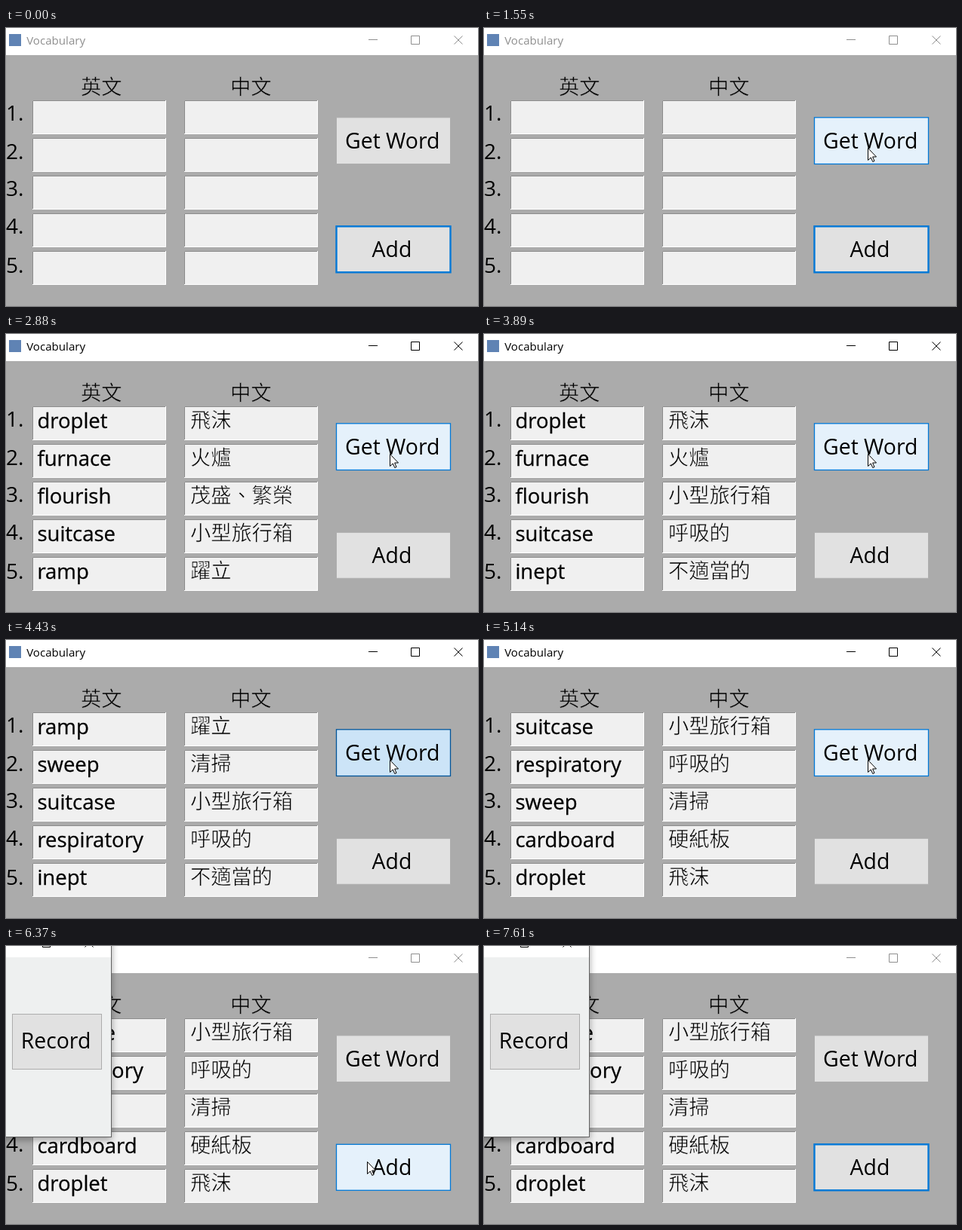
Write an HTML page that moves like this. It is 625x369 px and loops after 8000 ms.

```html
<!DOCTYPE html>
<html lang="zh-TW">
<head>
<meta charset="utf-8">
<title>Vocabulary</title>
<style>
  html, body { margin: 0; width: 100%; height: 100%; overflow: hidden; background: #ababab; }
  svg { display: block; }
  text { font: 28px "Open Sans", "Noto Sans", sans-serif; fill: #000; }
  /* A thin stroke in the backdrop colour slims the glyphs */
  .zh {
    font: 300 27.2px "Noto Sans CJK TC", "Noto Sans CJK", "Noto Sans CJK JP", sans-serif;
    stroke: #f0f0f0;
    stroke-width: .6;
  }
  .head { stroke: #ababab; }
  .word { font-size: 27.5px; stroke: #000; stroke-width: .3; }
  .label { font-size: 28.4px; text-anchor: middle; }
  .caption { font-size: 15.1px; fill: inherit; }
  .btn { fill: #e1e1e1; stroke: #adadad; stroke-width: 1; }

  .bar, .get, .add, .reel, .popup, .cursor { animation: 8s step-end infinite; }
  .bar { animation-name: bar; }
  .get { animation-name: get; }
  .add { animation-name: add; }
  .reel { animation-name: reel; }
  .popup {
    animation-name: popup;
    transform-origin: -80px 60px;
    filter: drop-shadow(0 3px 5px rgba(0, 0, 0, .35));
  }
  .cursor { animation-name: cursor; }

  /* Title bar: inactive, active, inactive */
  @keyframes bar {
    0%, 76.625%, 100% { fill: #8f8f8f; stroke: #8f8f8f; }
    23.375% { fill: #000; stroke: #000; }
  }
  @keyframes get {
    0%, 74.625%, 100% { fill: #e1e1e1; stroke: #adadad; stroke-width: 1; }
    14.46%, 24.25%, 41.75%, 56.375% { fill: #e5f1fb; stroke: #0078d7; stroke-width: 1.3; }
    23.375%, 39.875%, 55.375% { fill: #cce4f7; stroke: #005499; stroke-width: 1.3; }
    68.06% { fill: #e1e1e1; stroke: #0078d7; stroke-width: 2.4; }
  }
  @keyframes add {
    0%, 80.5%, 100% { fill: #e1e1e1; stroke: #0078d7; stroke-width: 2.4; }
    23.375% { fill: #e1e1e1; stroke: #adadad; stroke-width: 1; }
    70.875%, 76.625% { fill: #e5f1fb; stroke: #0078d7; stroke-width: 1.3; }
    74.625% { fill: #cce4f7; stroke: #005499; stroke-width: 1.3; }
  }
  /* Word sheets are stacked 400px apart */
  @keyframes reel {
    0% { transform: translateY(0); }
    36% { transform: translateY(-400px); }
    48.625% { transform: translateY(-800px); }
    49.5% { transform: translateY(-1200px); }
    64.25%, 100% { transform: translateY(-1600px); }
  }
  @keyframes popup {
    0% { opacity: 0; transform: scale(.93); }
    76.625% { opacity: .3; transform: scale(.95); }
    77.625% { opacity: .65; transform: scale(.98); }
    78.625% { opacity: .9; transform: scale(.99); }
    79.625%, 100% { opacity: 1; transform: none; }
  }
  @keyframes cursor {
    0%, 3.75%, 82.5%, 95.125%, 100% { transform: translate(-40px, 0); }
    2.75% { transform: translate(587px, 336px); }

    10.625% { transform: translate(615px, 254px); }
    11.58% { transform: translate(592px, 229px); }
    12.54% { transform: translate(568px, 204px); }
    13.5% { transform: translate(545px, 183px); }
    14.46% { transform: translate(527px, 170px); }
    15.42% { transform: translate(514px, 163px); }
    16.375% { transform: translate(508px, 161px); }
    18.25% { transform: translate(508px, 160px); }
    19.375% { transform: translate(508px, 159px); }

    67.125% { transform: translate(506px, 165px); }
    68.06% { transform: translate(501px, 183px); }
    69% { transform: translate(494px, 212px); }
    69.94% { transform: translate(487px, 243px); }
    70.875% { transform: translate(482px, 266px); }
    71.81% { transform: translate(479px, 280px); }
    72.75% { transform: translate(478px, 286px); }

    80.5% { transform: translate(424px, 240px); }
    81.5% { transform: translate(345px, 172px); }

    90.25% { transform: translate(276px, 109px); }
    91.22% { transform: translate(222px, 98px); }
    92.19% { transform: translate(156px, 81px); }
    93.16% { transform: translate(92px, 64px); }
    94.125% { transform: translate(48px, 54px); }
  }
</style>
</head>
<body>
<svg width="625" height="369" viewBox="0 0 625 369">
  <rect width="625" height="369" fill="#ababab"/>
  <rect width="625" height="36" fill="#fff"/>
  <rect x="4" y="8" width="16" height="16" fill="#5f83b4"/>
  <g class="bar">
    <text class="caption" x="27.2" y="22" stroke="none">Vocabulary</text>
    <path d="M480 15.5h12M536.5 10.5h11v11h-11zM593.5 10.5l11 11m0-11l-11 11" fill="none"/>
  </g>

  <text class="zh head" x="99" y="88">英文</text>
  <text class="zh head" x="297" y="88">中文</text>
  <g id="form"></g>
  <g class="reel" id="reel"></g>

  <rect class="btn get" x="437.5" y="118.8" width="151" height="61.7"/>
  <text class="label" x="511.7" y="160">Get Word</text>
  <rect class="btn add" x="437.5" y="263.3" width="151" height="61"/>
  <text class="label" x="511" y="304">Add</text>

  <g class="popup">
    <rect x="-300.5" y="-200.5" width="440" height="454" fill="#eef0f0" stroke="#626262"/>
    <rect x="-300" y="-200" width="439" height="215" fill="#fff"/>
    <path d="M48.5 -8.5h10v10h-10zM104.5 -9.5l11 11m0-11l-11 11" fill="none" stroke="#000"/>
    <rect class="btn" x="8.5" y="90.5" width="118" height="73"/>
    <text class="label" x="66" y="136">Record</text>
  </g>

  <path class="cursor" d="M.5 .5V16.5L4.3 13L6.8 18.5L9 17.5L6.6 12H11.5Z" fill="#fff" stroke="#000"/>
</svg>
<script>
  const zh = {
    droplet: "飛沫", furnace: "火爐", flourish: "茂盛、繁榮", suitcase: "小型旅行箱",
    ramp: "躍立", respiratory: "呼吸的", inept: "不適當的", sweep: "清掃", cardboard: "硬紙板"
  };
  // Left column, and the right column where it is ahead of the left
  const sheets = [
    ["droplet furnace flourish suitcase ramp"],
    ["droplet furnace flourish suitcase inept", "droplet furnace suitcase respiratory inept"],
    ["ramp sweep suitcase respiratory inept"],
    ["suitcase respiratory sweep cardboard droplet"]
  ];

  const field = (x, y) =>
    `<path d="M${x} ${y}h177v45h-177z" fill="#f0f0f0"/>
     <path d="M${x}.5 ${y + 45}v-44.5h176" fill="none" stroke="#8c8c8c"/>
     <path d="M${x} ${y + 44.5}h176.5v-44.5" fill="none" stroke="#fff"/>`;
  const text = (x, y, s, cls = "") => `<text class="${cls}" x="${x}" y="${y}">${s}</text>`;

  document.getElementById("form").innerHTML = [123, 174, 223, 273, 325].map((y, i) =>
    text(0, y, `${i + 1}.`) + field(35, 96 + i * 50) + field(236, 96 + i * 50)).join("");

  document.getElementById("reel").innerHTML = sheets.map(([left, right = left], n) => {
    const meanings = right.split(" ");
    return left.split(" ").map((word, i) => {
      const y = 125 + i * 50 + (n + 1) * 400;
      return text(41.4, y, word, "word") + text(244, y - 1, zh[meanings[i]], "zh");
    }).join("");
  }).join("");
</script>
</body>
</html>
```
